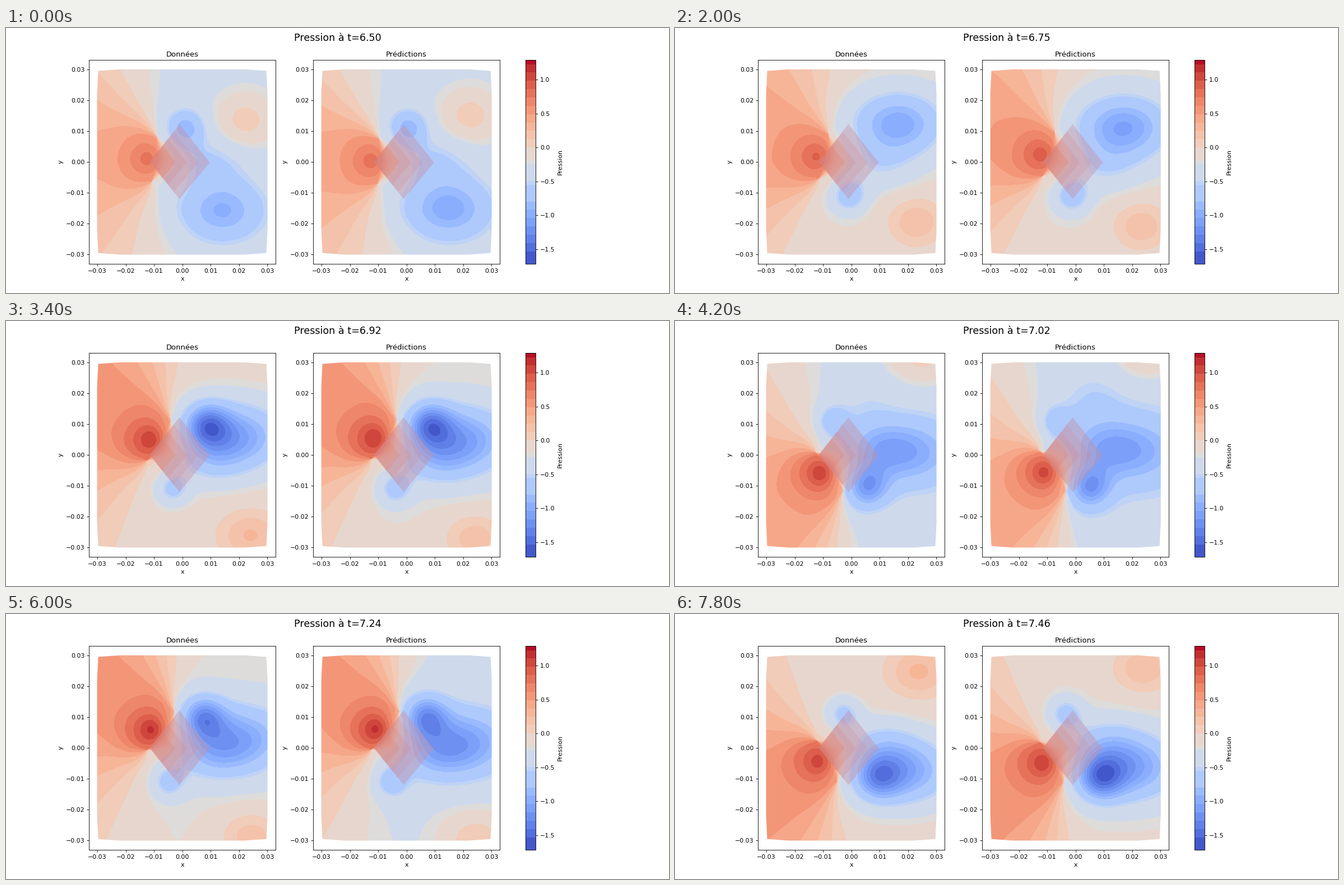
Recreate the animation shown at these times as a matplotlib script. Size 1183 by 473 pixels, loop 8000 ms.

```python
import numpy as np
import matplotlib.pyplot as plt
from matplotlib.animation import FuncAnimation
from matplotlib.cm import ScalarMappable
from matplotlib.colors import ListedColormap, Normalize
from matplotlib.patches import Polygon

W, H = 1183, 473
DPI = W / 15
FRAMES, INTERVAL = 40, 200
T0, DT = 6.502, 0.0246
CYCLE = 0.842            # share of a shedding cycle between two frames
PRED_LAG, PRED_SHIFT = 0.02, -0.04
VMIN, VMAX, BANDS = -1.716, 1.287, 49

# Bands from the top of the scale that share one colour
EDGES = [0, *range(1, 22, 2), 24, 25, 29, 30, *range(34, 47, 2), 49]

# Lengths are in hundredths; the grid covers the measured square
X, Y = np.meshgrid(np.linspace(-3.02, 3.02, 305), np.linspace(-3.01, 3.01, 333))


def band_colours():
    colours = []
    for a, b in zip(EDGES[:-1], EDGES[1:]):
        colours += [plt.cm.coolwarm(1 - (a + b) / 2 / BANDS)] * (b - a)
    return ListedColormap(colours[::-1])


def smooth(t):
    t = np.clip(t, 0, 1)
    return t * t * (3 - 2 * t)


def wave(ph, peak=0.0, harmonic=1):
    return np.cos(2 * np.pi * harmonic * (ph - peak))


def age(ph, birth, span):
    """Age from 0 to 1 of a structure born once per cycle; 1 once it is gone."""
    return min((ph - birth) % 1 / span, 1)


def blob(x, y, amp, sx, sy):
    return amp * np.exp(-((X - x) / sx) ** 2 - ((Y - y) / sy) ** 2)


def corner(ph):
    """Upper point where the flow leaves the body, and the angle it fades at."""
    s = wave(ph, 0.04)
    x = -1 - 0.5 * s + 0.25 * s * s
    y = 0.75 - 0.57 * s - 0.12 * s * s
    return (x, y), 218 + 45 * wave(ph, -0.03)


def fan_side(a, b, end, turn):
    """Fade by angle around corner a, starting at the face towards b."""
    base = np.arctan2(b[1] - a[1], b[0] - a[0])
    angle = np.arctan2(Y - a[1], X - a[0])
    psi = np.degrees(turn * (angle - base)) % 360
    return np.maximum(smooth((end - psi) / (end - 80)), smooth((psi - 290) / 70))


def front(ph, base):
    """High pressure ahead of the face, swinging up and down."""
    upper, end1 = corner(ph)
    (x, y), end2 = corner(ph + 0.5)
    lower = x, -y
    widen = -80 * (base + 0.25)
    level = 0.45 + 0.1 * wave(ph, 0.12, 2)
    fan = (fan_side(upper, lower, end1 + widen, -1)
           * fan_side(lower, upper, end2 + widen, 1))
    s = wave(ph, 0.04)
    x = -1.3 + 0.15 * s * s
    return ((level - base) * fan
            + blob(x, -0.6 * s, 0.32 + 0.15 * s * s, 1.0, 0.9)
            + blob(x + 0.1, -0.6 * s, 0.1 + 0.12 * s * s, 0.4, 0.4))


def attached(ph, side):
    """Small vortex that forms at a corner and slides along the body."""
    t = age(ph, -0.58, 0.8)
    depth = (0.35 + 0.5 * t) * smooth(t / 0.1) * smooth((1 - t) / 0.12)
    size = 0.5 + 0.35 * t
    return blob(-0.85 + 1.9 * t, side * (0.2 * t ** 4 - 1.12), -depth,
                size, 0.9 * size)


def detached(ph, side):
    """Large vortex that sinks away from the wake axis and fades."""
    t = age(ph, -0.2, 0.8)
    depth = 0.95 * np.sin(np.pi * t ** 0.85) ** 2
    return blob(2 - 2.2 * t ** 3, side * (0.2 - 1.95 * smooth((t - 0.15) / 0.6)),
                -depth, 2.1 - 1.4 * t * t, 1.2 - 0.4 * t * t)


def lobe(ph, side):
    """Higher pressure that enters at the far corner, opposite the vortex."""
    t = age(ph, -0.2, 0.65)
    amp = 0.38 * smooth(t / 0.2) * smooth((1 - t) / 0.2)
    return blob(2.7 - 0.6 * t, side * (3.5 - 3.4 * t * t), amp, 1.4 - 0.5 * t, 0.85)


def pressure(ph, shift=0.0):
    base = -0.25 + 0.15 * wave(ph, 0.17, 2) + shift
    p = base + front(ph, base)
    p += blob(1.0, 0.3 * wave(ph, 0.1), -0.25, 1.3, 0.8)
    # The upper half repeats the lower one half a cycle later
    for side, late in ((1, 0), (-1, 0.5)):
        for part in (attached, detached, lobe):
            p += part(ph + late, side)
    return p


def add_body(ax):
    """Nested translucent diamonds that share their left corner."""
    diamond = np.array([(-1.15, 0), (-0.1, 1.22), (0.97, -0.02), (-0.1, -1.2)])
    for i in range(4):
        pts = diamond[0] + (diamond - diamond[0]) * (1 - 0.19 * i)
        colour = (0.78 + 0.04 * i, 0.56 - 0.03 * i, 0.63 - 0.08 * i)
        ax.add_patch(Polygon(pts / 100, fc=colour, alpha=0.2 if i else 0.4,
                             lw=0, zorder=2))


def add_panel(ax, title):
    extent = 0.01 * np.array([X[0, 0], X[0, -1], Y[0, 0], Y[-1, 0]])
    im = ax.imshow(np.zeros_like(X), extent=extent, origin="lower", aspect="auto",
                   cmap=cmap, norm=norm, interpolation="nearest", zorder=1)
    quarter = np.array([(3.01, 2.2), (2.97, 2.95), (2.2, 3.0)])
    outline = np.vstack([quarter, quarter[::-1] * (-1, 1),
                         -quarter, quarter[::-1] * (1, -1)])
    im.set_clip_path(Polygon(outline / 100, transform=ax.transData))
    add_body(ax)
    ax.set(title=title, xlabel="x", ylabel="y",
           xlim=(-0.033, 0.033), ylim=(-0.033, 0.033))
    return im


cmap, norm = band_colours(), Normalize(VMIN, VMAX)
fig, axes = plt.subplots(1, 2, figsize=((W + 0.01) / DPI, (H + 0.01) / DPI), dpi=DPI)
fig.subplots_adjust(top=0.879)
data, pred = [add_panel(ax, name) for ax, name in zip(axes, ("Données", "Prédictions"))]
fig.colorbar(ScalarMappable(norm, cmap), ax=list(axes), label="Pression")
heading = fig.suptitle("", fontsize=16)


def update(n):
    ph = CYCLE * (n - 21) % 1
    heading.set_text(f"Pression à t={T0 + DT * n:.2f}")
    data.set_data(pressure(ph))
    pred.set_data(pressure(ph - PRED_LAG, PRED_SHIFT))
    return [heading, data, pred]


anim = FuncAnimation(fig, update, frames=FRAMES, interval=INTERVAL,
                     repeat=True, repeat_delay=0, blit=False)
plt.show()
```
